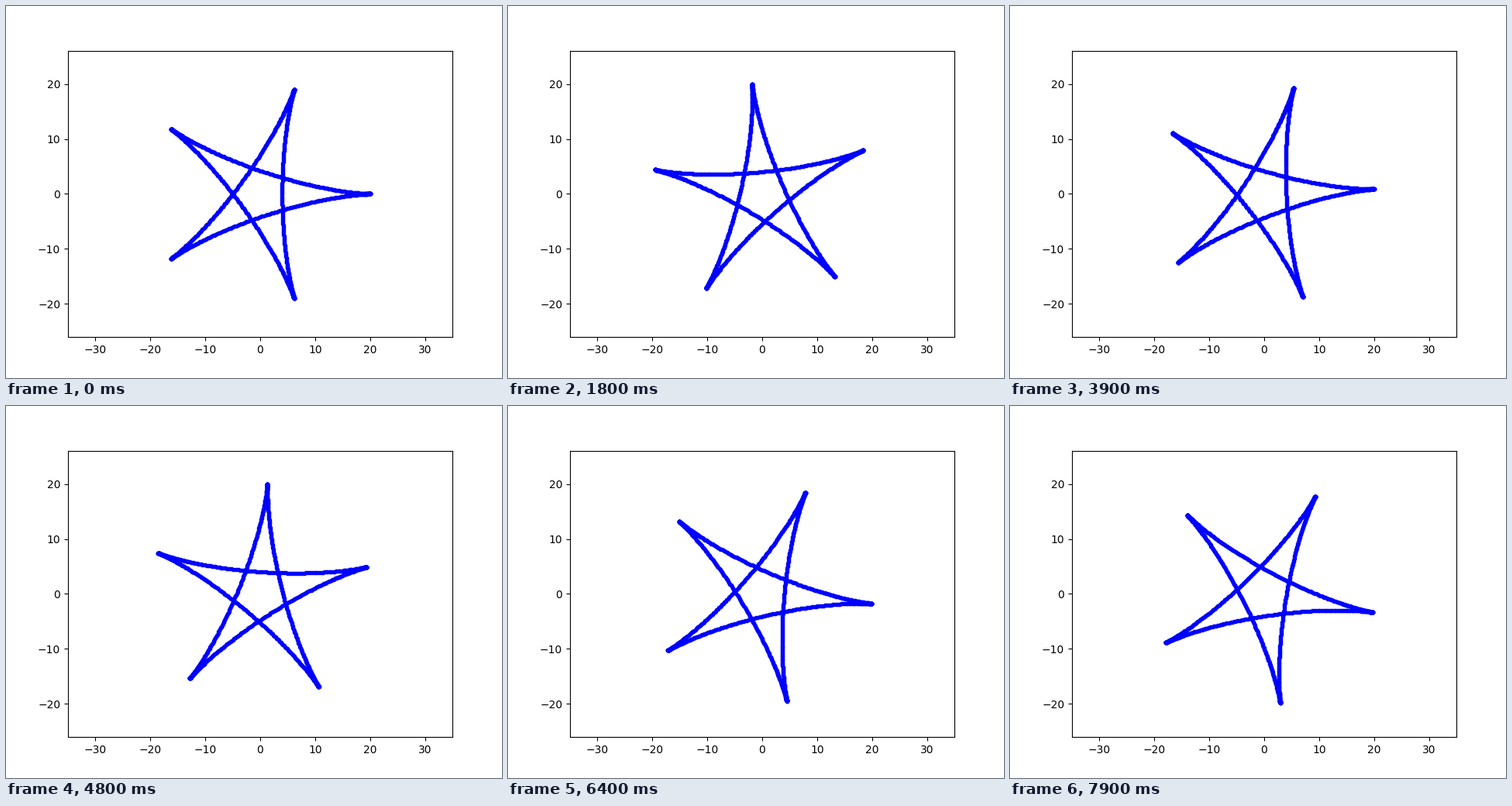
A matplotlib script that plays this animation: 640x480 px, repeating every 8000 ms.

```python
import numpy as np
import matplotlib.pyplot as plt
from matplotlib.animation import FuncAnimation

FRAMES = 80
INTERVAL = 100  # ms
SPIN = 1.0      # radians per frame
HALF_WIDTH = 35

# Five-cusped hypocycloid, traced once as a complex curve
u = np.linspace(0, 2 * np.pi, 1000)
star = 12 * np.exp(2j * u) + 8 * np.exp(-3j * u)

fig = plt.figure(figsize=(6.4, 4.8), dpi=100)
ax = fig.add_axes([0.125, 0.11, 0.775, 0.77])
half_height = HALF_WIDTH * (0.77 * 4.8) / (0.775 * 6.4)
ax.set_xlim(-HALF_WIDTH, HALF_WIDTH)
ax.set_ylim(-half_height, half_height)
dots, = ax.plot([], [], "b.")


def update(frame):
    turned = star * np.exp(1j * SPIN * frame)
    dots.set_data(turned.real, turned.imag)
    return dots,


anim = FuncAnimation(fig, update, frames=FRAMES, interval=INTERVAL,
                     repeat=True, repeat_delay=0)
plt.show()
```
